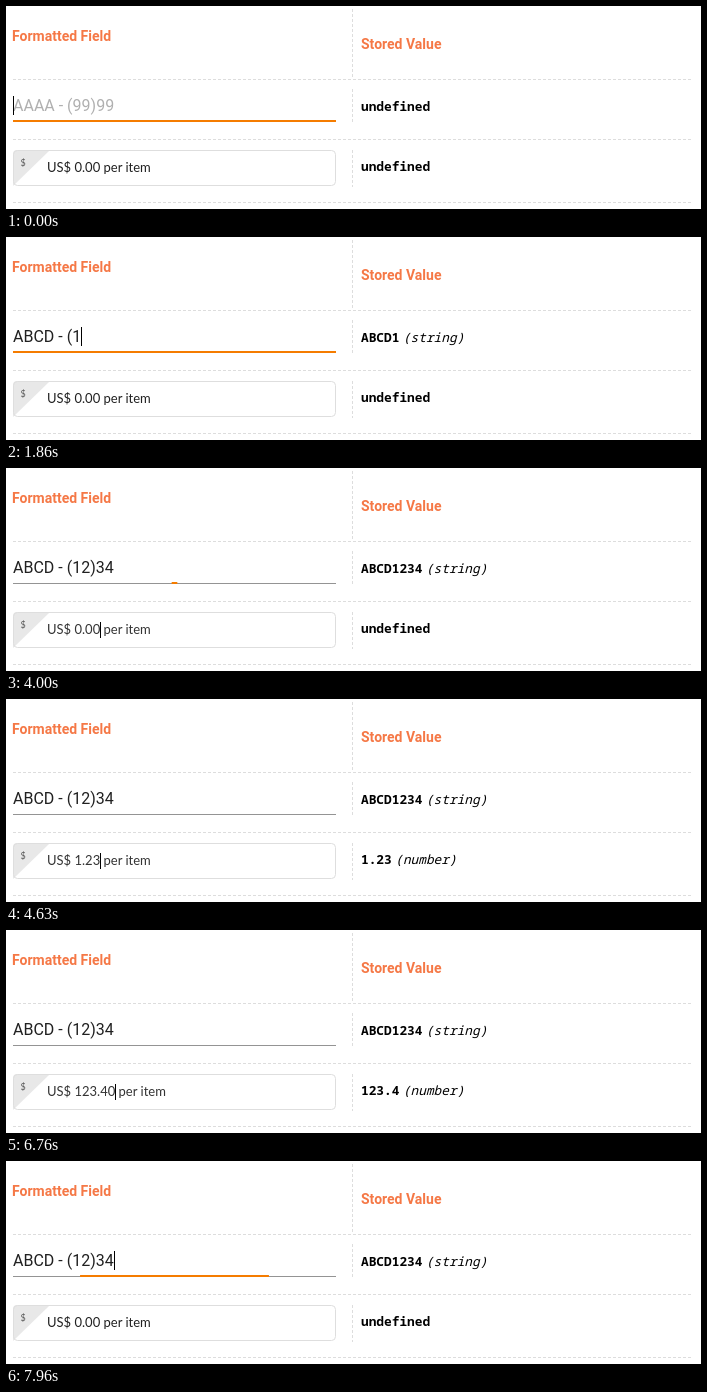
Write an HTML page that moves like this. It is 695 px wide and 203 px high and loops after 8 s.

```html
<!DOCTYPE html>
<html lang="en">
<head>
<meta charset="utf-8">
<title>Formatted fields</title>
<style>
  html, body { margin: 0; width: 100%; height: 100%; overflow: hidden; background: #fff; }
  svg { display: block; }
  text { white-space: pre; }
  .head { font: 700 14px Roboto, sans-serif; fill: #f57846; }
  .code { font: 700 12.8px "Noto Sans Mono", monospace; fill: #000; }
  .type { font-weight: 400; font-style: italic; }
  #mask { font: 400 16px Roboto, sans-serif; }
  #price { font: 400 13px Lato, sans-serif; }
  .rule { stroke: #ddd; stroke-dasharray: 3 2; fill: none; }
</style>
</head>
<body>
<svg width="695" height="203" viewBox="0 0 695 203">
  <path class="rule" d="M7 73.5H687M7 133.5H687M7 196.5H687M346.5 3V73M346.5 83V118M346.5 144V181"/>
  <text class="head" x="6" y="35">Formatted Field</text>
  <text class="head" x="355" y="43">Stored Value</text>

  <rect x="7" y="115" width="323" height="1" fill="#949494"/>
  <rect id="line" y="114" height="2" fill="#f57c00"/>
  <text id="mask" x="7" y="105"></text>

  <path d="M7 180V148Q7 144 11 144H44Z" fill="#e8e8e8"/>
  <rect x="7.5" y="144.5" width="322" height="35" rx="4" fill="none" stroke="#dedede"/>
  <text x="14.5" y="160" font-family="Lato, sans-serif" font-size="9" fill="#555">$</text>
  <text id="price" x="41" y="166"></text>

  <text class="code" x="355" y="105"><tspan id="value1"></tspan><tspan id="type1" class="type" dx="3.5"></tspan></text>
  <text class="code" x="355" y="165"><tspan id="value2"></tspan><tspan id="type2" class="type" dx="3.5"></tspan></text>
  <rect id="caret" width="1" fill="#000"/>
</svg>
<script>
const LOOP = 8000, BLUR = 3840, REFOCUS = 7960;
const keyTimes = [500, 650, 930, 1160, 1860, 2140, 2550, 3010];
const centsKeys = [
  [0, 0], [4210, 1], [4410, 12], [4630, 123], [4960, 1234], [5320, 12340], [5700, 123400],
  [6760, 12340], [6920, 1234], [7090, 123], [7220, 12], [7350, 1], [7450, 0]
];
const caretOff = [[1710, 1860], [3520, 3840], [6250, 6760]];

const $ = id => document.getElementById(id);
const set = (el, attrs) => { for (const k in attrs) el.setAttribute(k, attrs[k]); };
const setText = (el, s) => { if (el.textContent !== s) el.textContent = s; };

// cubic-bezier(0, 0, .2, 1)
function easeOut(x) {
  if (x <= 0) return 0;
  if (x >= 1) return 1;
  let lo = 0, hi = 1;
  for (let i = 0; i < 24; i++) {
    const s = (lo + hi) / 2;
    if (0.6 * (1 - s) * s * s + s ** 3 < x) lo = s; else hi = s;
  }
  return 3 * (1 - lo) * lo * lo + lo ** 3;
}

function applyMask(raw) {
  if (raw.length < 4) return raw;
  const tail = raw.length > 6 ? ")" + raw.slice(6) : "";
  return raw.slice(0, 4) + " - (" + raw.slice(4, 6) + tail;
}

function lineScale(t) {
  if (t < BLUR) return 1;
  if (t >= REFOCUS) return easeOut((t - REFOCUS + 50) / 200);
  const step = Math.floor((t - BLUR) / 52.5);
  return 1 - easeOut((step * 53.5 + 4) / 200);
}

function showStored(n, value, type) {
  setText($("value" + n), value || "undefined");
  setText($("type" + n), value ? `(${type})` : "");
}

function placeCaret(field, count, y, height) {
  const width = count ? field.getSubStringLength(0, count) : 0;
  set($("caret"), { x: Math.round(+field.getAttribute("x") + width), y, height });
}

function draw(t) {
  const raw = "ABCD1234".slice(0, keyTimes.filter(k => k <= t).length);
  const masked = applyMask(raw);
  setText($("mask"), masked || "AAAA - (99)99");
  set($("mask"), { fill: masked ? "#212121" : "#b0b0b0" });
  showStored(1, raw, "string");

  const cents = centsKeys.filter(k => k[0] <= t).pop()[1];
  const amount = "US$ " + (cents / 100).toLocaleString("en-US", { minimumFractionDigits: 2 });
  const onPrice = t >= BLUR && t < REFOCUS;
  setText($("price"), amount + " per item");
  set($("price"), { fill: onPrice ? "#333" : "#212121" });
  showStored(2, cents ? String(cents / 100) : "", "number");

  const width = 323 * lineScale(t);
  set($("line"), { x: 168.5 - width / 2, width });

  if (onPrice) placeCaret($("price"), amount.length, 154, 16);
  else placeCaret($("mask"), masked.length, 90, 19);
  const hidden = caretOff.some(([from, to]) => t >= from && t < to);
  set($("caret"), { visibility: hidden ? "hidden" : "visible" });
}

const start = performance.now();
function tick() {
  draw((performance.now() - start) % LOOP);
  requestAnimationFrame(tick);
}
tick();
</script>
</body>
</html>
```
